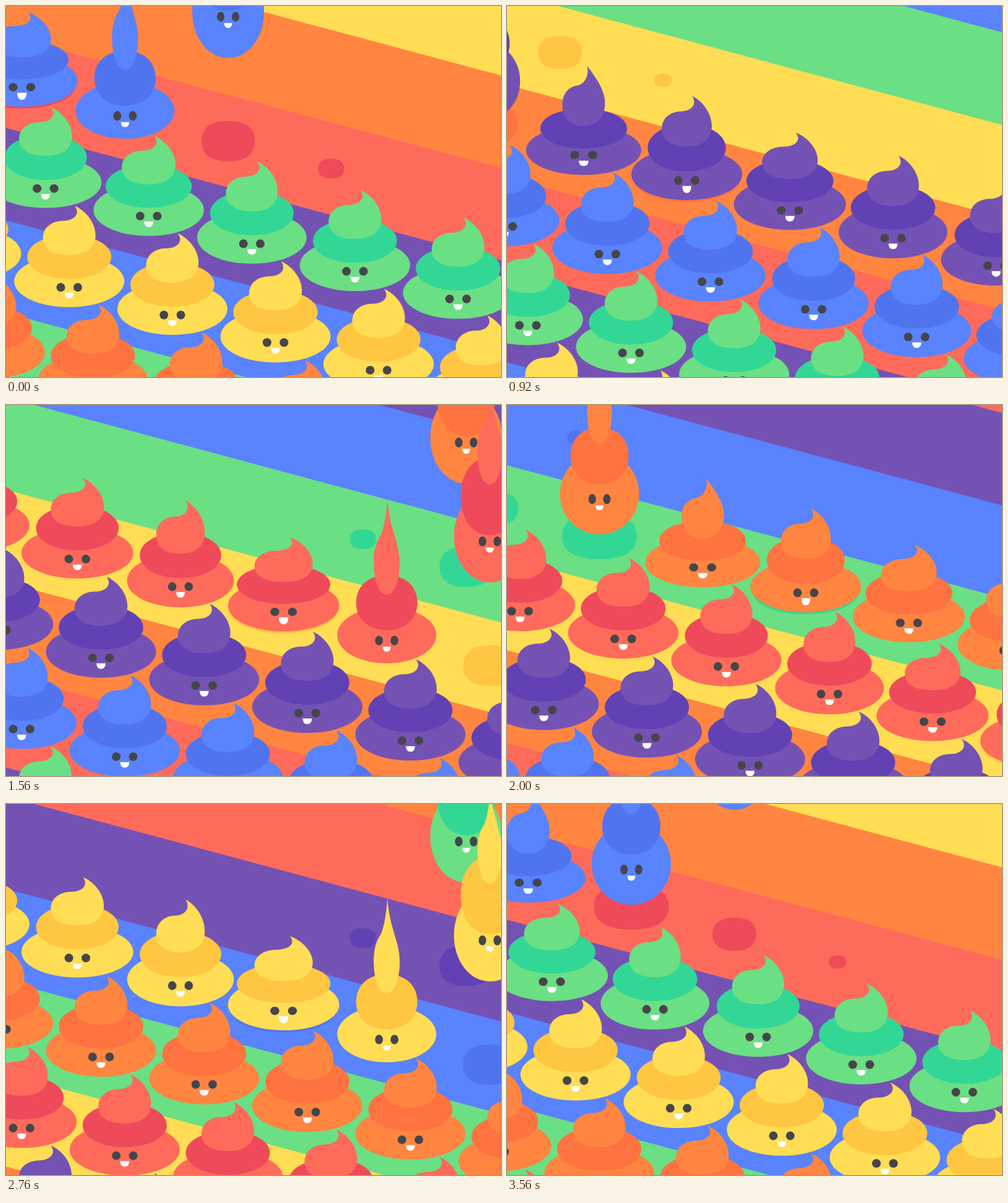
These frames come from a looping animation (800x600 px, 3600 ms). An HTML page:

```html
<!DOCTYPE html>
<html lang="en">
<head>
<meta charset="utf-8">
<title>Rainbow rows</title>
<style>
html, body { margin: 0; width: 100%; height: 100%; overflow: hidden; background: #ff6b5b; }
svg { display: block; width: 100%; height: 100%; }
</style>
</head>
<body>
<svg id="stage" viewBox="0 0 800 600"></svg>
<script>
const LOOP = 3600, STEP = 600, DELAY = 120, FRAME = 40;
const SLOPE = Math.tan(Math.PI / 12);
const COL = 500 / 3, BAND = 149.6, PAN = 128.4;
const LIFT = BAND - PAN * SLOPE;
const SPEED = 1.675;

// [light, dark] in the order the rows arrive
const COLORS = [
  ['#5983ff', '#5074ef'], ['#7452b4', '#6141b4'], ['#ff6b5b', '#ef4a5a'],
  ['#ff8541', '#ff7340'], ['#ffdd54', '#ffc642'], ['#6bdf83', '#32d796']
];

// base and mid: [cy, rx, ry]; tip: [rx, bottom, top]; face: [y, eye offset]
const FALL = [
  { at: -240, base: [-224, 58, 74.5], mid: [-289, 47, 63], tip: [20, -308, -462], face: [-206, 12] },
  { at: -160, base: [-84, 64, 66], mid: [-145, 47, 46], tip: [20, -164, -316], face: [-65, 11.8] },
  { at: -120, base: [-19.5, 80, 45.5], mid: [-72, 49.5, 44.5], tip: [21, -85, -240], face: [-1, 12.5] },
  { at: -40, base: [-17, 93, 40], mid: [-52, 70, 32], tip: [34.5, -56, -154], face: [0, 14.5] },
  settle(0)
];

// unit outlines: x in half widths, y from bottom 0 to top 1
const CURL = [.21, 1, .69, .885, 1, .63, 1, .41, 1, .14, .62, 0, 0, 0, -.62, 0, -1, .12, -1, .35,
  -1, .57, -.64, .695, -.23, .695, .2, .7, .43, .84, .21, 1];
const DROP = [.05, 1, .2, .68, 1, .55, 1, .335, 1, .14, .55, 0, 0, 0, -.55, 0, -1, .14, -1, .335,
  -1, .48, -.75, .56, -.5, .61, -.25, .66, 0, .85, .05, 1];

const stage = document.getElementById('stage');
const clamp = (v, a, b) => Math.min(b, Math.max(a, v));
const mix = (a, b, k) => a + (b - a) * k;
const num = v => v.toFixed(2);
const color = n => COLORS[((n % 6) + 6) % 6];
const shape = (d, fill) => `<path d="${d}" fill="${fill}"/>`;
const place = (x, y, body) => `<g transform="translate(${num(x)} ${num(y)})">${body}</g>`;

// each layer rings down after the landing, a little later than the one that leads it
function settle(u) {
  const wave = lag => Math.exp(-u / 220) * Math.cos((u - lag) / 90 * Math.PI);
  const lead = wave(0), next = wave(20), last = wave(40);
  return {
    at: u,
    base: [-18.7, 89 + 5 * last, 42 - 2.5 * last],
    mid: [-58 + 5 * lead, 68 + 7.5 * lead, 35.5 - 4 * lead],
    tip: [42.5 + 6 * next, -61 + 4 * lead, -140.5 + 14 * next],
    face: [0, 13.7 + .7 * next]
  };
}

function pose(u) {
  if (u >= 0) return settle(u);
  const i = Math.max(1, FALL.findIndex(p => p.at > u));
  const a = FALL[i - 1], b = FALL[i] || a;
  const k = clamp((u - a.at) / (b.at - a.at), 0, 1);
  const blend = part => a[part].map((v, n) => mix(v, b[part][n], k));
  return { base: blend('base'), mid: blend('mid'), tip: blend('tip'), face: blend('face') };
}

function blob([cy, rx, ry], k) {
  const x = num(rx), y = num(ry), hx = num(rx * k), hy = num(ry * k);
  const ix = num(rx - rx * k), iy = num(ry - ry * k);
  return `M${-x} ${num(cy)}c0 ${-hy} ${ix} ${-y} ${x} ${-y}s${x} ${iy} ${x} ${y}` +
    `s${-ix} ${y} ${-x} ${y}s${-x} ${-iy} ${-x} ${-y}z`;
}

function swirl([rx, bottom, top], drop) {
  const p = CURL.map((v, n) => {
    const m = mix(v, DROP[n], drop);
    return num(n % 2 ? mix(bottom, top, m) : m * rx);
  });
  return `M${p[0]} ${p[1]}C${p.slice(2).join(' ')}Z`;
}

function face([y, dx], drop, h) {
  const rx = dx * .51, w = dx * .53, up = 8.8 + 1.2 * drop;
  const eye = x => `<ellipse cx="${num(x)}" cy="${num(y - up)}" rx="${num(rx)}" ry="${num(49 / rx)}" fill="#46454b"/>`;
  const mouth = `M${num(-w)} ${num(y)}H${num(w)}C${num(w)} ${num(y + h * .7)} ${num(w * .6)} ${num(y + h)} 0 ${num(y + h)}` +
    `S${num(-w)} ${num(y + h * .7)} ${num(-w)} ${num(y)}Z`;
  return eye(-dx) + eye(dx) + shape(mouth, '#fff');
}

function character(u, [light, dark]) {
  const p = pose(u), drop = clamp(-u / 120, 0, 1);
  const hop = 5.6 * Math.sin(clamp((u + 40) / 160, 0, 1) * Math.PI);
  const fall = SPEED * Math.min(0, u + 240);
  return place(0, fall - hop,
    shape(blob(p.base, .56), light) +
    shape(blob(p.mid, mix(.57, .6, drop)), dark) +
    shape(swirl(p.tip, drop), light) +
    face(p.face, drop, 9 - drop + .6 * hop));
}

function shadow(u, fill) {
  const age = u + 480;
  const rx = Math.min(86, .175 * age * (1 + .4 * (age / 480) ** 4));
  return shape(blob([-15, rx, Math.min(37, .76 * rx)], u < -100 ? .66 : .57), fill);
}

function band(row, t) {
  const y = 47.6 + BAND * (t / STEP - row), drop = 800 * SLOPE;
  // a small overlap hides seams between bands
  const low = y + BAND + 1;
  return shape(`M0 ${num(y)}L800 ${num(y + drop)}V${num(low + drop)}L0 ${num(low)}Z`, color(row + 2)[0]);
}

function line(row, t) {
  const q = t / STEP - row, x0 = 25.7 - PAN * q, y0 = 144.1 + LIFT * q;
  let under = '', over = '';
  for (let i = Math.ceil((-110 - x0) / COL); x0 + i * COL < 910; i++) {
    // rows land in alternating directions
    const order = row % 2 ? 4 - i : i;
    const u = t - row * STEP - order * DELAY;
    if (u <= -480) continue;
    const x = x0 + i * COL, y = y0 + i * COL * SLOPE;
    if (u < 200) under += place(x, y, shadow(u, color(row + 2)[1]));
    over += place(x, y, character(u, color(row)));
  }
  return under + over;
}

function draw(t) {
  const now = Math.floor(t / STEP);
  let out = '';
  for (let r = now + 6; r >= now - 5; r--) out += band(r, t);
  for (let r = now + 2; r >= now - 5; r--) out += line(r, t);
  stage.innerHTML = out;
}

function tick() {
  const t = Math.floor((performance.now() + 2) / FRAME) * FRAME;
  draw(t % LOOP);
  requestAnimationFrame(tick);
}
tick();
</script>
</body>
</html>
```
